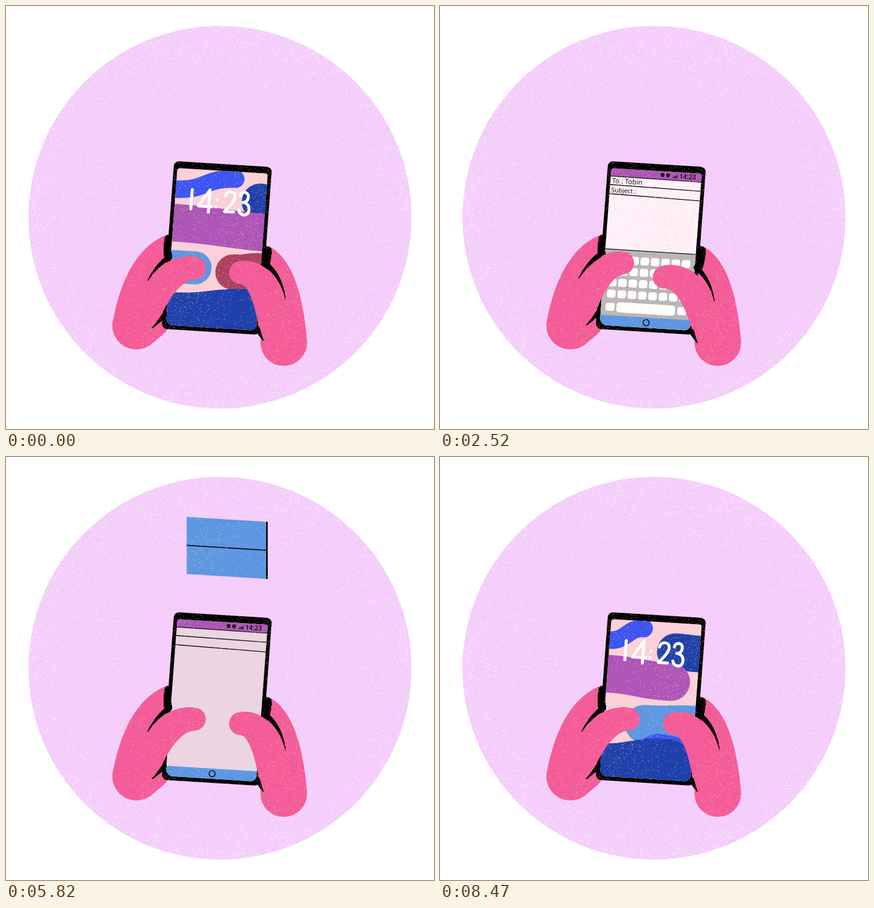
An HTML page with a canvas for the animation above (8670 ms loop, 752x744 px).

```html
<!DOCTYPE html>
<html lang="en">
<head>
<meta charset="utf-8">
<title>Sending a message</title>
<style>
html, body { margin: 0; width: 100%; height: 100%; overflow: hidden; background: #fff; }
canvas { display: block; }
</style>
</head>
<body>
<canvas id="stage" width="752" height="744"></canvas>
<script>
const W = 752, H = 744, LOOP = 8670;
const SCREEN_W = 159, SCREEN_H = 276;
const PINK = '#f45c99', BLACK = '#030203', PURPLE = '#ad55b8', LILAC = '#b17fc6', SKY = '#5b97e3',
      NAVY = '#1e40ac', BLUE = '#3d55f2', MAROON = '#aa415f', VIOLET = '#8f5ce6', PAPER = '#fff1fa';

const stage = document.getElementById('stage').getContext('2d');
const ctx = newCanvas();

function newCanvas() {
  const c = document.createElement('canvas');
  c.width = W;
  c.height = H;
  return c.getContext('2d');
}

function seeded(seed) {
  return () => {
    seed = (seed * 1664525 + 1013904223) % 4294967296;
    return seed / 4294967296;
  };
}

// ---------- timing ----------
// Each scene is drawn as a run of held poses: start, last pose, number of poses.
const scenes = {
  rest: [0, 0, 1], swipe: [200, 1040, 6], flick: [1160, 1160, 1], type: [1280, 2240, 8],
  typeOn: [2380, 3360, 8], send: [3500, 4530, 9], fold: [4640, 5660, 8],
  leave: [5820, 6670, 8], drift: [6870, 7870, 6], settle: [8070, 8470, 3]
};
const poses = Object.values(scenes).flatMap(([from, to, n]) =>
  Array.from({ length: n }, (_, i) => from + (to - from) * i / Math.max(1, n - 1)));

const lerp = (a, b, k) => a + (b - a) * k;
const progress = (t, from, to) => Math.min(1, Math.max(0, (t - from) / (to - from)));

// ---------- drawing helpers ----------
function rect(color, x, y, w, h, r = 0) {
  ctx.beginPath();
  ctx.roundRect(x, y, w, h, r);
  ctx.fillStyle = color;
  ctx.fill();
}

function line(x0, y0, x1, y1, width = 1.3) {
  ctx.beginPath();
  ctx.moveTo(x0, y0);
  ctx.lineTo(x1, y1);
  ctx.lineWidth = width;
  ctx.strokeStyle = BLACK;
  ctx.stroke();
}

function dot(x, y, r, color) {
  ctx.beginPath();
  ctx.arc(x, y, r, 0, 7);
  ctx.fillStyle = color;
  ctx.fill();
}

// A curved, tapering stroke from one round end to another.
function limb(color, [x0, y0, r0], [cx, cy], [x1, y1, r1]) {
  for (let i = 0; i <= 60; i++) {
    const k = i / 60;
    dot(lerp(lerp(x0, cx, k), lerp(cx, x1, k), k),
        lerp(lerp(y0, cy, k), lerp(cy, y1, k), k), lerp(r0, r1, k), color);
  }
}

function label(text, x, y, size, weight = 400) {
  ctx.font = `${weight} ${size}px "Open Sans", sans-serif`;
  ctx.fillStyle = BLACK;
  ctx.fillText(text, x, y);
}

function streaks(seed, count, x0, x1, end, reach) {
  const random = seeded(seed);
  for (let i = 0; i < count; i++) {
    const x = lerp(x0, x1, (i + random()) / count);
    const bottom = end - random() * reach * .3;
    line(x, bottom, x, bottom - reach * (.15 + .6 * random() ** 2), 1.1);
  }
}

// The phone leans: screen units run along its own edges.
function onPhone(draw) {
  ctx.save();
  ctx.transform(1, .062, -.0745, 1, 301, 285);
  draw();
  ctx.restore();
}

// ---------- wallpaper ----------
// Blobs slide in from a side; open, late and rest are their lengths at three moments.
const blobs = [
  { color: NAVY, y: 95, h: 130, tilt: 0, open: 128 },
  { color: LILAC, y: 8, h: 112, tilt: 4, open: 146 },
  { color: BLUE, y: 37, h: 31, tilt: -24, late: 74, rest: 119 },
  { color: NAVY, y: 52, h: 64, tilt: -2, late: 75, rest: 42, right: true },
  { color: PURPLE, y: 96, h: 66, tilt: 8, late: 146, rest: 215 },
  { color: SKY, y: 85, h: 62, tilt: 6, open: 89 },
  { color: SKY, y: 173, h: 58, tilt: 0, rest: 73 },
  { color: SKY, y: 176, h: 66, tilt: 4, late: 122, right: true },
  { color: MAROON, y: 150, h: 97, tilt: -3, open: 118, right: true },
  { color: MAROON, y: 171, h: 62, tilt: 5, rest: 79, right: true },
  { color: BLUE, y: 245, h: 80, tilt: -9, late: 100, right: true },
  { color: NAVY, y: 273, h: 110, tilt: -14, late: 169, rest: 215 },
  { color: VIOLET, y: 260, h: 79, tilt: -16, open: 128 }
];

function blob({ color, y, h, tilt, right, open = -60, late = -60, rest = -60 }, t) {
  const length = t < 700
    ? lerp(rest, open, progress(t, 200, 700))
    : lerp(open, late, progress(t, 6670, 8470));
  const x = length - h / 2;
  ctx.save();
  if (right) ctx.transform(-1, 0, 0, 1, SCREEN_W, 0);
  ctx.beginPath();
  ctx.moveTo(-200, y);
  ctx.lineTo(Math.min(0, x), y);
  ctx.bezierCurveTo(x / 2, y, x / 2, y + tilt, x, y + tilt);
  ctx.strokeStyle = color;
  ctx.lineWidth = h;
  ctx.lineCap = 'round';
  ctx.stroke();
  ctx.restore();
}

// Hand-lettered lock screen clock, 14:23.
const clock = new Path2D('M29 36V70M60 35L42 64H65M60 35V74M74 51V51.5M72.5 63.5V64' +
  'M88 44C89 33 105 33 105 44C105 52 96 62 88 71H104' +
  'M114 42C115 33 128 33 128 43C128 50 124 53 119 53C134 53 134 75 123 75C117 75 114 71 113 67');

function wallpaper(t) {
  rect('#fbd1da', -5, -20, 170, 330);
  for (const b of blobs) blob(b, t);
  ctx.save();
  ctx.strokeStyle = '#fff';
  ctx.lineWidth = 5.2;
  ctx.lineCap = ctx.lineJoin = 'round';
  ctx.stroke(clock);
  ctx.restore();
}

// ---------- mail ----------
function mailHead() {
  label('To : Tobin', 3, 26, 12);
  label('Subject :', 3, 42, 11);
}

function mailRules(width) {
  line(0, 29, width, 31);
  line(0, 45, width, 48);
}

function keyboard(top) {
  rect('#b8b7b8', -2, top, 164, 150);
  line(-2, top, 162, top, 1.2);
  for (let row = 0; row < 4; row++) {
    for (let i = 0; i < 8; i++) rect('#fff', 9 + i * 18.1, top + 11 + row * 20, 15, 14, 4);
  }
  for (const u of [8, 134]) rect('#fff', u, top + 94, 16, 14, 4);
  rect('#fff', 27, top + 92, 103, 18, 5);
}

function mail(t) {
  const sent = t >= 4250;
  rect(sent ? '#ebd5e4' : PAPER, -2, 0, 164, 290);
  rect(PURPLE, -2, 0, 164, 14);
  line(-2, 14, 162, 15, 1.2);
  for (const u of [90.5, 100.5]) dot(u, 6.7, 3.3, BLACK);
  for (let i = 0; i < 3; i++) line(109.5 + i * 3.2, 8 - i * 1.4, 109.5 + i * 3.2, 11, 1.6);
  label('14:23', 120, 11, 11.5, 600);
  mailRules(SCREEN_W);
  if (!sent) {
    const down = progress(t, 3370, 4144) ** 1.5;
    const top = 142 * (1 + down);
    mailHead();
    if (down > 0) streaks(5, 10, 8, 150, top, 120 * Math.min(1, down * 2));
    keyboard(top);
  }
  rect(SKY, -2, 258, 164, 22);
  ctx.beginPath();
  ctx.arc(81, 267, 5.4, 0, 7);
  ctx.lineWidth = 1.5;
  ctx.strokeStyle = BLACK;
  ctx.stroke();
}

function phone(t) {
  onPhone(() => {
    rect(BLACK, -6.5, -12, 172, 295, 9);
    ctx.beginPath();
    ctx.roundRect(0, 0, SCREEN_W, SCREEN_H, [5, 4, 10, 13]);
    ctx.clip();
    const open = progress(t, 700, 1160) ** 1.5 - progress(t, 6200, 6670);
    const top = SCREEN_H * (1 - open);
    ctx.save();
    ctx.translate(0, -251 * open);
    if (open < 1) wallpaper(t);
    ctx.restore();
    if (t > 6200 && t < 6800) streaks(9, 9, 6, 154, top, 75);
    ctx.translate(0, top);
    if (open > 0) mail(t);
    if (t > 800 && t < 1200) streaks(3, 5, 107, 130, 125, 110);
  });
}

// ---------- letter ----------
function letter(t) {
  if (t < 4250 || t > 6400) return;
  const rise = 1 - (1 - progress(t, 4144, 5223)) ** 2.5;
  const top = -201 * rise + 20 * progress(t, 5223, 5820);
  const fold = progress(t, 4640, 5223);
  const height = lerp(232, 100, fold);
  const flight = progress(t, 5820, 6306) ** 2;
  ctx.save();
  ctx.translate(-224 * flight, 0);
  onPhone(() => {
    if (fold === 1) {
      ctx.translate(3, top + 1);
      ctx.transform(1, 0, .075, 1, 0, 0);
      rect(SKY, 0, 0, 141, 100);
      line(141, 0, 141, 100, 2.8);
      line(0, 50, 141, 50, 1.8);
    } else {
      rect(PAPER, 2, top, 154, height);
      line(156, top, 156, top + height, 1.6);
      ctx.translate(3, top - 12);
      mailHead();
      mailRules(152);
      if (fold > 0) line(0, 12 + height / 2, 152, 12 + height / 2, 1.6);
    }
  });
  ctx.restore();
}

// ---------- hands ----------
function palms() {
  limb(PINK, [229, 562, 42], [242, 446], [300, 422, 24]);
  limb(PINK, [229, 562, 42], [238, 554], [248, 546, 42]);
  limb(PINK, [488, 592, 41], [486, 460], [445, 440, 22]);
}

// A thumb follows its tip; the bend and the skin folds follow part of the way.
function thumb([dx, dy], { tip, bend, base, crease, fold, shade }) {
  const moved = ([x, y, r], kx, ky = kx) => [x + dx * kx, y + dy * ky, r];
  const follow = (points, kx) => points.map(p => moved(p, kx, .5));
  limb(BLACK, ...shade);
  limb(PINK, moved(tip, 1), moved(bend, .7), base);
  limb(BLACK, ...follow(crease, .5));
  limb(BLACK, ...follow(fold, 0));
}

const leftThumb = {
  tip: [331, 461, 20], bend: [283, 458], base: [240, 543, 30],
  crease: [[249, 483, .7], [264, 457], [285, 443, 4.5]],
  fold: [[257, 566, .7], [269, 555], [278, 544, 4]],
  shade: [[284, 408, 5], [282, 425], [285, 441, 7]]
};
const rightThumb = {
  tip: [412, 469, 20], bend: [456, 464], base: [478, 575, 32],
  crease: [[491, 515, .7], [484, 477], [459, 456, 4.5]],
  fold: [[452, 588, .7], [447, 580], [442, 568, 4]],
  shade: [[460, 430, 7], [459, 444], [455, 458, 7]]
};

function thumbs(t) {
  const typing = t >= 1280 && t < 3500;
  const beat = (t - 2520) / 140;
  const press = rate => typing ? .5 + .5 * Math.cos(beat * rate) : 0;
  const swipe = typing ? 0 : t < 1280 ? progress(t, 520, 1160) : 0;
  const left = press(1.9), right = press(2.6);
  thumb([-10 * left, -9 * left], leftThumb);
  thumb([28 * swipe ** 4 - 18 * right, 8 * right - 251 * swipe ** 8], rightThumb);
}

// ---------- texture ----------
function grain(seed, count, color, maxLength, keep) {
  const g = newCanvas(), random = seeded(seed);
  g.fillStyle = color;
  for (let i = 0; i < count; i++) {
    const x = random() * W | 0, y = random() * H | 0, length = 1 + random() * maxLength | 0;
    if (random() < keep(x, y)) g.fillRect(x, y, length, 1);
  }
  return g.canvas;
}

const backdrop = newCanvas();
backdrop.arc(376, 371.5, 336.5, 0, 7);
backdrop.fillStyle = '#f4cdfa';
backdrop.fill();
backdrop.clip();
backdrop.drawImage(grain(7, 70000, 'rgba(255,250,255,.5)', 2, (x, y) => {
  const d = Math.hypot(x - 376, y - 372) / 337;
  return .22 + .5 * d ** 4 + .14 * Math.sin(y / 47 + Math.sin(x / 90));
}), 0, 0);
const specks = grain(31, 34000, 'rgba(255,192,158,.45)', 2,
  (x, y) => .6 + .25 * Math.sin(x / 31 + y / 53));

// ---------- loop ----------
function render(now) {
  const time = now % LOOP;
  const t = poses.findLast(p => p <= time + .01);
  ctx.clearRect(0, 0, W, H);
  palms();
  phone(t);
  letter(t);
  thumbs(t);
  ctx.globalCompositeOperation = 'source-atop';
  ctx.drawImage(specks, 0, 0);
  ctx.globalCompositeOperation = 'source-over';

  stage.fillStyle = '#fff';
  stage.fillRect(0, 0, W, H);
  stage.drawImage(backdrop.canvas, 0, 0);
  stage.drawImage(ctx.canvas, 0, 0);
}

let start;
function loop(now) {
  start ??= now;
  render(now - start);
  requestAnimationFrame(loop);
}
render(0);
requestAnimationFrame(loop);
</script>
</body>
</html>
```
